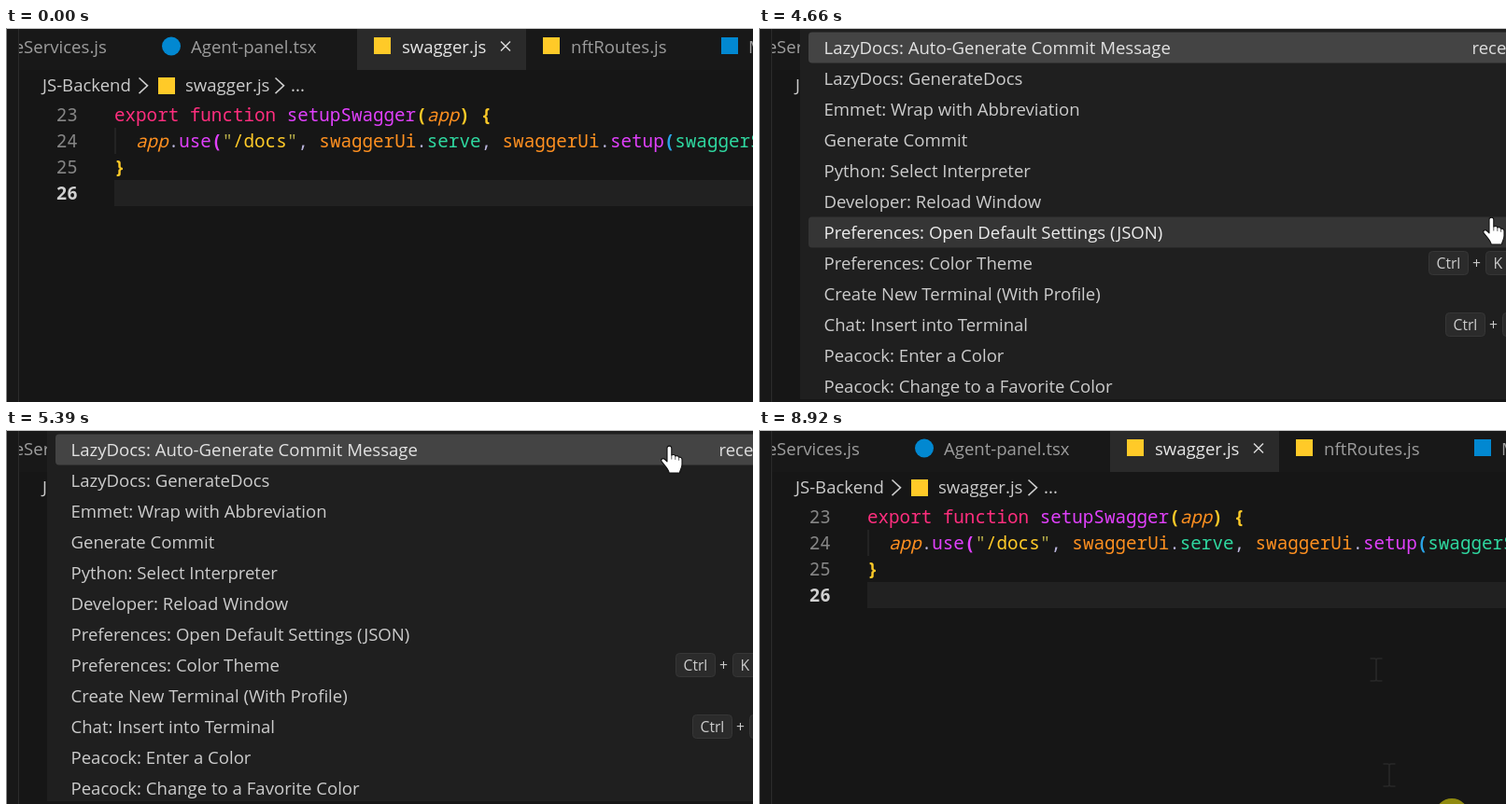
Animation of 800x401 px, one loop 9090 ms. Source, as an HTML page:

```html
<!DOCTYPE html>
<html lang="en">
<head>
<meta charset="utf-8">
<title>Editor command palette</title>
<style>
html, body { margin: 0; width: 100%; height: 100%; overflow: hidden; background: #161616; }
svg { display: block; }
text { white-space: pre; }
.ui { font: 18.57px "Open Sans", "Noto Sans", sans-serif; }
.tip { font: 17.1px "Open Sans", "Noto Sans", sans-serif; }
.key { font: 15.7px "Open Sans", "Noto Sans", sans-serif; }
.code { font: 500 19.24px "Noto Sans Mono", "DejaVu Sans Mono", monospace; }
</style>
</head>
<body>
<svg id="stage" width="800" height="401" viewBox="0 0 800 401"></svg>
<script>
const LOOP = 9090, ROW = 33, ROW_TOP = 4.5;
const stage = document.getElementById("stage");

function el(tag, attrs, parent = stage) {
  const node = document.createElementNS("http://www.w3.org/2000/svg", tag);
  for (const k in attrs) node.setAttribute(k, attrs[k]);
  return parent.appendChild(node);
}
const rect = (x, y, width, height, fill, parent, extra) =>
  el("rect", { x, y, width, height, fill, ...extra }, parent);
const group = parent => el("g", {}, parent);
function label(x, y, str, fill, parent, cls = "ui") {
  const node = el("text", { x, y, fill, class: cls }, parent);
  node.textContent = str;
  return node;
}

// Editor
const GREY = "#9d9d9d", PALE = "#cccccc", JS = "#ffca28", BLUE = "#0288d1";
const editor = group();
rect(0, 0, 800, 401, "#161616", editor);
rect(0, 0, 800, 45, "#181818", editor);
rect(376, 0, 181, 45, "#2a2a2a", editor);

label(8.7, 26.5, "eServices.js", GREY, editor);
el("circle", { cx: 177, cy: 19.5, r: 10, fill: BLUE }, editor);
label(198, 26.5, "Agent-panel.tsx", GREY, editor);
rect(394, 10, 18, 18, JS, editor);
label(424, 26.5, "swagger.js", "#e6e6e6", editor);
el("path", { d: "M530 14.5l10 10m0-10l-10 10", stroke: "#d8d8d8", "stroke-width": 1.5 }, editor);
rect(575, 10, 18, 18, JS, editor);
label(605, 26.5, "nftRoutes.js", GREY, editor);
rect(766, 10, 18, 18, BLUE, editor);
label(795, 26.5, "M", GREY, editor);

label(39, 68.3, "JS-Backend", PALE, editor);
rect(163, 53, 18, 18, JS, editor);
label(192, 68.3, "swagger.js", PALE, editor);
label(305, 68.3, "...", PALE, editor);
for (const x of [142.5, 288.5])
  el("path", { d: `M${x} 53.5l9 8.3-9 8.3`, fill: "none", stroke: PALE, "stroke-width": 1.6 }, editor);

rect(116, 163, 684, 28, "#212121", editor);
rect(116.5, 107, 1, 28, "#303030", editor);

const PINK = "#ff2e7e", MAGENTA = "#e040fb", YELLOW = "#ffca28", QUOTE = "#b9b04a",
      ORANGE = "#ff9020", GREEN = "#2fd8a0", LAVENDER = "#b9b4dc";
const lines = [
  [["export function ", PINK], ["setupSwagger", MAGENTA], ["(", YELLOW, "b"],
   ["app", ORANGE, "i"], [") {", YELLOW, "b"]],
  [["  app", ORANGE, "i"], [".", LAVENDER], ["use", MAGENTA], ["(", MAGENTA, "b"],
   ["\"", QUOTE], ["/docs", YELLOW], ["\"", QUOTE], [", ", LAVENDER], ["swaggerUi", ORANGE],
   [".", LAVENDER], ["serve", GREEN], [", ", LAVENDER], ["swaggerUi", ORANGE], [".", LAVENDER],
   ["setup", MAGENTA], ["(", "#2aa5e8", "b"], ["swaggerSpec", GREEN]],
  [["}", YELLOW, "b"]],
  []
];
lines.forEach((tokens, i) => {
  const y = 99.7 + 28 * i, last = i === 3;
  const num = label(53.8, y, String(23 + i), last ? "#d0d0d0" : "#858585", editor, "code");
  num.style.fontWeight = last ? 600 : 400;
  const line = label(116, y, "", PALE, editor, "code");
  for (const [str, fill, face] of tokens) {
    const span = el("tspan", { fill }, line);
    span.textContent = str;
    if (face === "b") span.style.fontWeight = 600;
    if (face === "i") span.style.fontStyle = "italic";
  }
});

const caret = rect(116, 163, 2.5, 28, "#aeafad");
const scrollbar = rect(281, 41, 519, 4, "rgba(121,121,121,.25)");

const tip = group();
rect(557.5, 45, 260, 36.5, "#252525", tip, { stroke: "#303030" });
label(570, 69.5, "C:\\Users\\netowner\\Documents\\JS-Backend", "#b43fd0", tip, "tip");

// Sidebar edge
rect(0, 0, 13, 401, "#181818");
rect(13, 0, 1, 401, "#2b2b2b");

// Command palette
const menu = group();
rect(44, 0, 756, 398, "#1f1f1f", menu);
rect(53, ROW_TOP, 760, ROW, "#444444", menu, { rx: 4 });
const hover = rect(53, 0, 760, ROW, "#353535", menu, { rx: 4 });
const items = [
  "LazyDocs: Auto-Generate Commit Message",
  "LazyDocs: GenerateDocs",
  "Emmet: Wrap with Abbreviation",
  "Generate Commit",
  "Python: Select Interpreter",
  "Developer: Reload Window",
  "Preferences: Open Default Settings (JSON)",
  "Preferences: Color Theme",
  "Create New Terminal (With Profile)",
  "Chat: Insert into Terminal",
  "Peacock: Enter a Color",
  "Peacock: Change to a Favorite Color"
].map((str, i) => label(69.5, 27.7 + ROW * i, str, PALE, menu));
label(763.5, 27.7, "recently used", "#dddddd", menu);

function keycap(x, y, w, str) {
  rect(x + .5, y - 12.5, w, 25, "#2b2b2b", menu, { rx: 4, stroke: "#363636" });
  label(x + 8.5, y + 6, str, PALE, menu, "key");
}
for (const [x, y, key] of [[717, 252, "K"], [735, 318, "R"]]) {
  keycap(x, y, 42, "Ctrl");
  label(x + 47, y + 6, "+", PALE, menu, "key");
  keycap(x + 61, y, 30, key);
}

// Window edge
rect(0, 0, 800, 1, "#c8c8c8");
rect(0, 0, 1, 401, "#8a8a8a");

// Pointers
const halo = el("circle", { r: 18, fill: "rgba(225,215,10,.6)" });
const BEAM = "M-6.5-12h4.5q2 0 2 2v20q0 2-2 2h-4.5M6.5-12h-4.5q-2 0-2 2M6.5 12h-4.5q-2 0-2-2";
const makeBeam = (x, y) => el("path", {
  d: BEAM, fill: "none", stroke: "#292929", "stroke-width": 1.6, transform: `translate(${x} ${y})`
});
const trail = [[7530, 661, 257], [7600, 675, 370]].map(([at, x, y]) => ({ at, node: makeBeam(x, y) }));
const beam = makeBeam(0, 0);
const hand = group();
el("path", {
  d: "M6 2.5a2.4 2.4 0 0 1 4.8 0v7.5c1.5-1 3.6-.6 4 .9 1.6-.7 3.5 0 3.8 1.4 1.8-.5 3.4.5 3.4 2.4v5" +
     "c0 4-2 5.4-2.6 9.3H8.2C7.6 25 5 23 .2 16.9-1.4 14.5 1.6 12.5 3.6 14.5L6 16.8Z",
  fill: "#fff", stroke: "#111", "stroke-width": 1.1, "stroke-linejoin": "round"
}, hand);
el("path", { d: "M10.8 10v4.5M14.8 10.9v4M18.6 12.3v3.4", stroke: "#333", "stroke-width": .8 }, hand);

// Stepped tracks: [time, x, y], hidden where there is no place
const handTrack = [
  [0], [4660, 776, 203], [4790, 757, 150], [4860, 741, 103], [4930, 732, 84], [4990, 728, 78],
  [5250, 722, 60], [5320, 714, 36], [5390, 702, 17], [5460, 701, 9], [5530, 703, 5], [5590, 705, 4],
  [6060, 703, 8], [6130, 699, 13], [6200, 694, 19], [6270, 691, 22],
  [7260, 688, 30], [7330, 680, 56], [7400]
];
const beamTrack = [
  [0], [2060, 792, 378], [2130, 770, 350], [2200, 748, 318], [2260, 733, 299], [2330, 745, 300],
  [2400, 778, 312], [2470], [7400, 676, 120], [7470, 664, 190], [7530]
];
const haloTrack = [[0], [6610, 700, 21], [6930], [8920, 742, 413]];
const caretOn = [[2800, 3330], [3790, 4050], [6800, 7330], [7810, 8360], [8820, 8920]];

const at = (track, t) => track.findLast(step => step[0] <= t);
const during = (t, from, to) => t >= from && t < to;
const show = (node, on) => node.setAttribute("visibility", on ? "visible" : "hidden");
function place(node, [, x, y]) {
  show(node, x !== undefined);
  if (x !== undefined) node.setAttribute("transform", `translate(${x} ${y})`);
}

function draw(t) {
  const pos = at(handTrack, t), open = during(t, 4050, 6800);
  place(hand, pos);
  place(beam, at(beamTrack, t));
  place(halo, at(haloTrack, t));
  menu.style.display = open ? "" : "none";
  const row = pos.length > 1 ? Math.floor((pos[2] + 1 - ROW_TOP) / ROW) : -1;
  hover.style.display = row > 0 ? "" : "none";
  hover.setAttribute("y", ROW_TOP + ROW * row);
  items.forEach((item, i) =>
    item.setAttribute("fill", i === 0 ? "#e2e2e2" : i === row ? "#ececec" : PALE));
  show(caret, caretOn.some(([from, to]) => during(t, from, to)));
  show(scrollbar, during(t, 6930, 8160));
  show(tip, during(t, 7260, 7670));
  for (const { at, node } of trail) show(node, t >= at);
}

const start = performance.now();
function tick() {
  draw((performance.now() - start) % LOOP);
  requestAnimationFrame(tick);
}
tick();
</script>
</body>
</html>
```
